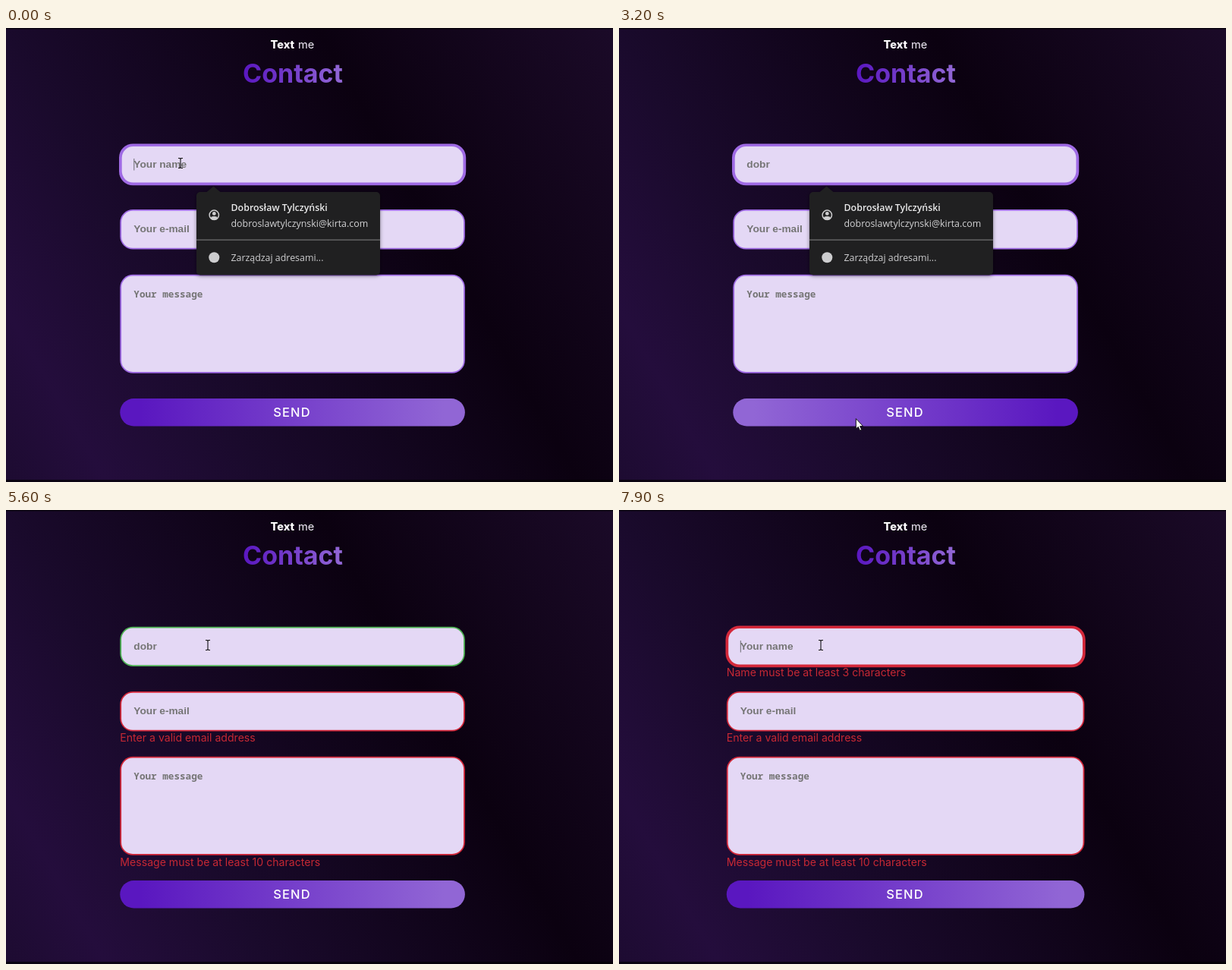
An HTML page with a canvas that plays this animation: 800 px wide and 598 px high, repeating every 8000 ms.

```html
<!DOCTYPE html>
<html lang="en">
<head>
<meta charset="utf-8">
<title>Contact form</title>
<style>
  html, body { margin: 0; width: 100%; height: 100%; overflow: hidden; background: #0c0212; }
  canvas { display: block; }
</style>
</head>
<body>
<canvas id="stage" width="800" height="598"></canvas>
<script>
const ctx = document.getElementById('stage').getContext('2d');
const LOOP = 8000, STEP = 100;
const INTER = 'Inter, sans-serif';
const ARIAL = '"Liberation Sans", Arial, sans-serif';
const MONO = '"Noto Sans Mono", monospace';
const UI = '"Open Sans", sans-serif';
const PURPLE = '#9f6ae4', GREEN = '#4db353', RED = '#d4283a', GREY = '#757575';

// [time, value]; a value holds until the next entry
const TYPED = [[0, ''], [500, 'd'], [700, 'do'], [900, 'dob'], [1300, 'dobr'],
  [6900, 'dob'], [7100, 'do'], [7300, 'd'], [7500, '']];
const CURSOR = [[0, 230, 178], [2300, 230, 178], [2700, 300, 550], [2900, 300, 550],
  [3300, 314, 508], [4900, 314, 508], [5500, 266, 178], [LOOP, 266, 178]];
const BLUR = 3400, SUBMIT = 3500, FOCUS = 5700, ERASE = 6900, INVALID = 7100;

const ramp = (t, start, length) => Math.min(1, Math.max(0, (t - start) / length));
const held = (list, t) => list.filter(e => e[0] <= t).pop();
const within = (p, x, y, w, h) => p.x >= x && p.x <= x + w && p.y >= y && p.y <= y + h;

function gradient(x0, y0, x1, y1, stops) {
  const g = ctx.createLinearGradient(x0, y0, x1, y1);
  stops.forEach(([at, color]) => g.addColorStop(at, color));
  return g;
}

function text(str, x, y, font, color, spacing = 0) {
  ctx.font = font;
  ctx.fillStyle = color;
  ctx.letterSpacing = spacing + 'px';
  ctx.fillText(str, x, y);
}

function roundRect(x, y, w, h, r) {
  ctx.beginPath();
  ctx.roundRect(x, y, w, h, r);
}

function disc(x, y, r) {
  ctx.beginPath();
  ctx.arc(x, y, r, 0, 7);
}

function cursorAt(t) {
  const i = CURSOR.findIndex(k => k[0] > t);
  const [t0, x0, y0] = CURSOR[i - 1], [t1, x1, y1] = CURSOR[i];
  const u = (t - t0) / (t1 - t0), e = u * u * (3 - 2 * u);
  return { x: x0 + (x1 - x0) * e, y: y0 + (y1 - y0) * e };
}

function background() {
  // 60 degree gradient across the stage
  ctx.fillStyle = gradient(-29, 547, 829, 51, [
    [0, '#1d0b31'], [0.115, '#240d3c'], [0.3, '#1a0a2c'], [0.66, '#0b0110'], [1, '#1b0a28']]);
  ctx.fillRect(0, 0, 800, 598);
  ctx.fillStyle = 'rgba(0,0,0,.65)';
  ctx.fillRect(0, 0, 800, 1.5);
  ctx.fillRect(0, 595, 800, 3);
}

function heading() {
  text('Text', 348.5, 27, '800 14.6px ' + INTER, '#fff');
  text('me', 385, 27, '400 14.6px ' + INTER, '#f4f0fa');
  text('Contact', 312, 72, '700 34px ' + INTER,
    gradient(313, 0, 441, 0, [[0, '#5a17c0'], [1, '#9166d5']]));
}

function field(x, y, w, h, border, focused) {
  const grow = focused ? 1.3 : 0;
  roundRect(x - grow, y - grow, w + 2 * grow, h + 2 * grow, 17 + grow);
  ctx.fillStyle = border;
  ctx.fill();
  const b = focused ? 2.4 : 1.8;
  roundRect(x + b, y + b, w - 2 * b, h - 2 * b, 15);
  ctx.fillStyle = '#e4d8f5';
  ctx.fill();
}

function error(str, x, y, alpha, color) {
  ctx.globalAlpha = alpha;
  text(str, x, y, '400 14.1px ' + INTER, color);
  ctx.globalAlpha = 1;
}

function popup(alpha) {
  const scale = 1 - 0.058 * (1 - alpha);
  ctx.save();
  ctx.globalAlpha = alpha;
  ctx.translate(372, 271);
  ctx.scale(scale, scale);
  ctx.translate(-372, -271);

  ctx.shadowColor = 'rgba(0,0,0,.45)';
  ctx.shadowBlur = 5;
  ctx.shadowOffsetY = 1;
  ctx.fillStyle = '#202021';
  roundRect(251, 216, 242, 109.5, 5);
  ctx.moveTo(264, 216.5);
  ctx.lineTo(273.5, 208.5);
  ctx.lineTo(283, 216.5);
  ctx.fill();
  ctx.shadowColor = 'transparent';

  ctx.fillStyle = '#727274';
  ctx.fillRect(251, 278.5, 242, 1.2);

  // account icon
  ctx.strokeStyle = ctx.fillStyle = '#cdcdcf';
  ctx.lineWidth = 1.5;
  disc(274.3, 246.3, 6.2);
  ctx.stroke();
  disc(274.3, 244.4, 2.4);
  ctx.fill();
  ctx.beginPath();
  ctx.ellipse(274.3, 250.4, 4.4, 2.3, 0, 0, 7);
  ctx.fill();

  disc(274.3, 302.3, 7);
  ctx.fill();

  text('Dobrosław Tylczyński', 296.5, 241, '600 12.4px ' + UI, '#e9e9ea');
  text('dobroslawtylczynski@kirta.com', 296.5, 262, '400 12.4px ' + UI, '#d3d3d5');
  text('Zarządzaj adresami...', 296.5, 307, '400 12.4px ' + UI, '#cdcdcf');
  ctx.restore();
}

function beam({ x, y }) {
  ctx.strokeStyle = '#111';
  ctx.lineWidth = 1.1;
  ctx.beginPath();
  for (const s of [-1, 1]) {
    ctx.moveTo(x - 3, y + s * 6.5);
    ctx.lineTo(x - 1, y + s * 6.5);
    ctx.lineTo(x, y + s * 5.5);
    ctx.lineTo(x + 1, y + s * 6.5);
    ctx.lineTo(x + 3, y + s * 6.5);
  }
  ctx.moveTo(x, y - 6);
  ctx.lineTo(x, y + 6);
  ctx.stroke();
}

function arrow({ x, y }) {
  const outline = [0, 0, 0, 13.5, 3, 10.8, 5.2, 15.6, 7.4, 14.6, 5.3, 10, 9.4, 10];
  ctx.beginPath();
  for (let i = 0; i < outline.length; i += 2) ctx.lineTo(x + 0.5 + outline[i], y + outline[i + 1]);
  ctx.closePath();
  ctx.fillStyle = '#fff';
  ctx.strokeStyle = '#111';
  ctx.lineWidth = 1;
  ctx.fill();
  ctx.stroke();
}

function draw(t) {
  const [keyTime, typed] = held(TYPED, t);
  const focused = t < BLUR || t >= FOCUS;
  const submitted = t >= SUBMIT;
  const extra = 8.5 * ramp(t, INVALID, 200);
  const x = 150 + 0.3 - extra, w = 454.6 + 2 * extra, tx = x + 18;
  const popupAlpha = t < FOCUS ? 1 - ramp(t, BLUR, 260) : 1 - ramp(t, ERASE, 260);
  const mouse = cursorAt(t);

  background();
  heading();

  const nameBorder = !submitted ? PURPLE : t < INVALID ? GREEN : RED;
  const otherBorder = submitted ? RED : PURPLE;
  field(x, 153.7, w, 52.3, nameBorder, focused);
  field(x, 239, w, 52.6, otherBorder);
  field(x, 324.8, w, 130, otherBorder);

  const inputFont = '700 13.7px ' + ARIAL;
  text(typed || 'Your name', tx, 184, inputFont, GREY);
  const caretX = tx + (typed ? ctx.measureText(typed).width : 0);
  text('Your e-mail', tx, 269, inputFont, GREY);
  text('Your message', tx, 355, '700 12.65px ' + MONO, GREY);

  const since = t - (t >= FOCUS ? Math.max(FOCUS, keyTime) : keyTime);
  if (focused && since % 1000 < 500) {
    ctx.fillStyle = '#6c6c70';
    ctx.fillRect(caretX, 172, 1, 15.5);
  }

  const errorColor = t < 5500 ? '#dc2a38' : '#c62834';
  const shown = ramp(t, 3560, 300);
  error('Name must be at least 3 characters', x, 219, ramp(t, INVALID, 300), errorColor);
  error('Enter a valid email address', x, 305, shown, errorColor);
  error('Message must be at least 10 characters', x, 468.5, shown, errorColor);

  const hover = within(mouse, x, 488, w, 36.5);
  const ends = hover ? ['#9166d5', '#5a17c0'] : ['#5a17c0', '#9166d5'];
  roundRect(x, 488, w, 36.5, 18.2);
  ctx.fillStyle = gradient(x, 0, x + w, 0, [[0, ends[0]], [0.06, ends[0]], [0.94, ends[1]], [1, ends[1]]]);
  ctx.fill();
  text('SEND', 352.3, 512, '500 16.5px ' + INTER, '#fff', 1.1);

  if (popupAlpha > 0) popup(popupAlpha);

  const overPopup = popupAlpha > 0.5 && within(mouse, 251, 216, 242, 110);
  const overField = [[154, 52], [239, 52], [325, 130]].some(([y, h]) => within(mouse, x, y, w, h));
  (overField && !overPopup ? beam : arrow)(mouse);
}

function tick() {
  const t = performance.now() % LOOP;
  draw(Math.floor(t / STEP) * STEP);
  requestAnimationFrame(tick);
}
tick();
</script>
</body>
</html>
```
